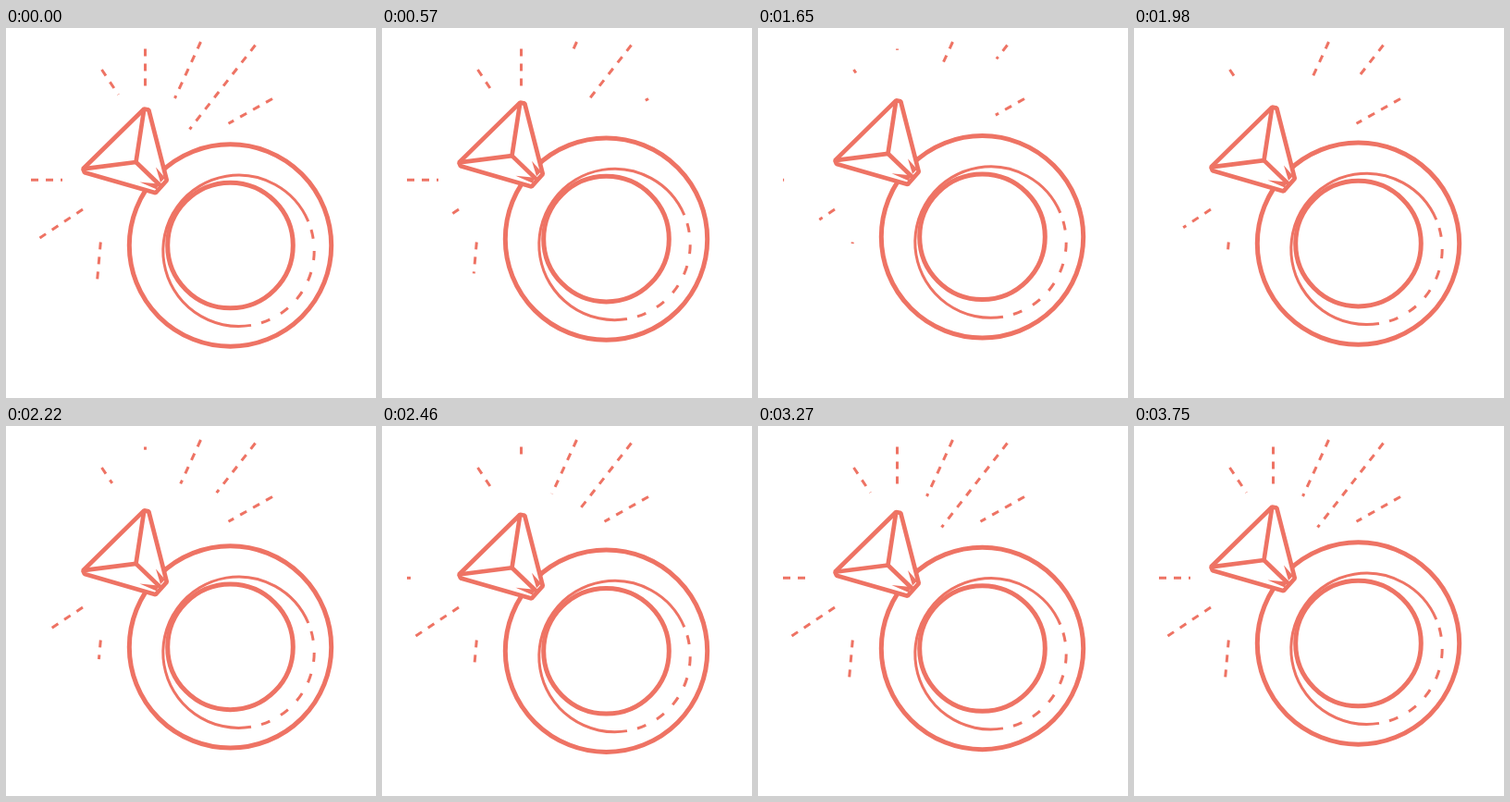
Write an HTML page with a canvas that moves like this. It is 400x400 px and loops after 4.05 s.

```html
<!DOCTYPE html>
<html lang="en">
<head>
<meta charset="utf-8">
<title>Diamond ring</title>
<style>
  html, body { margin: 0; width: 100%; height: 100%; overflow: hidden; background: #fff; }
  canvas { display: block; width: 400px; height: 400px; }
</style>
</head>
<body>
<canvas id="stage"></canvas>
<script>
const LOOP = 4050, LAST = 3750, STEP = 30;
const CORAL = '#ee7364';
const canvas = document.getElementById('stage');
const ctx = canvas.getContext('2d');
const scale = window.devicePixelRatio || 1;
canvas.width = canvas.height = 400 * scale;

// Vertical path of the ring: [time, y, speed]
const bob = [[0, 235, -0.0125], [1370, 223.2, 0], [2650, 244.5, 0], [LAST, 235, -0.0107]];

// Each ray: fixed end, free end, [shrink start, end], [grow start, end]
const rays = [
  { from: [103.5, 45], to: [121.5, 72], shrink: [430, 1030], grow: [1500, 2650] },
  { from: [150.5, 22.5], to: [150.5, 62.5], shrink: [1070, 1670], grow: [2130, 3240] },
  { from: [210.5, 15], to: [182.5, 76], shrink: [70, 670], grow: [1170, 2520] },
  { from: [269.5, 18.5], to: [198.5, 109.5], shrink: [370, 970], grow: [1430, 2770] },
  { from: [288, 76.5], to: [240.5, 103.3], shrink: [10, 610], grow: [1060, 1960] },
  { from: [27, 164.3], to: [61, 164.3], shrink: [1070, 1670], grow: [2300, 3650] },
  { from: [83, 196], to: [36.5, 227], shrink: [60, 660], grow: [1230, 2400] },
  { from: [102.3, 231.5], to: [98.7, 271.5], shrink: [480, 1057], grow: [1600, 2800] }
];

const clamp = v => Math.min(1, Math.max(0, v));
const progress = (t, [start, end]) => clamp((t - start) / (end - start));
const radians = deg => deg * Math.PI / 180;

function ringY(t) {
  const i = Math.max(1, bob.findIndex(key => t <= key[0]));
  const [t0, y0, v0] = bob[i - 1], [t1, y1, v1] = bob[i];
  const span = t1 - t0, u = (t - t0) / span, w = 1 - u;
  return y0 * w * w * (1 + 2 * u) + y1 * u * u * (3 - 2 * u)
    + span * (v0 * u * w * w - v1 * u * u * w);
}

function arc(x, y, r, start, end, width) {
  ctx.lineWidth = width;
  ctx.beginPath();
  ctx.arc(x, y, r, radians(start), radians(end));
  ctx.stroke();
}

function trace(points, closed) {
  ctx.beginPath();
  points.forEach(p => ctx.lineTo(...p));
  if (closed) ctx.closePath();
}

function drawRay({ from, to, shrink, grow }, t) {
  const part = t < grow[0] ? 1 - progress(t, shrink) : progress(t, grow);
  if (part <= 0) return;
  const tip = from.map((v, i) => v + (to[i] - v) * part);
  ctx.lineWidth = 3;
  ctx.setLineDash([8, 8]);
  trace([from, tip]);
  ctx.stroke();
  ctx.setLineDash([]);
}

function drawRing() {
  arc(242.5, 235, 109.2, 0, 360, 5);
  arc(242.5, 235, 67.8, 0, 360, 5);
  arc(251.5, 240.8, 81.7, 80.5, 337.2, 3);
  for (let i = 0; i < 6; i++) {
    const start = -16.2 + i * 16.35;
    arc(251.5, 240.8, 81.7, start, start + 7, 3);
  }
}

function drawDiamond() {
  const apex = [149.3, 87.5], left = [83.3, 152.3], hub = [140.5, 145];
  ctx.lineWidth = 4.7;
  ctx.lineJoin = 'bevel';
  trace([apex, left, [85, 156.2], [161.7, 178.3], [173.8, 164.7], [154.3, 88.5]], true);
  ctx.fillStyle = '#fff';
  ctx.fill();
  ctx.stroke();
  trace([left, hub, apex]);
  ctx.stroke();
  trace([hub, [167, 170.5]]);
  ctx.stroke();
  ctx.fillStyle = CORAL;
  trace([[144.5, 166.5], [165, 168.5], [163, 174.5]], true);
  ctx.fill();
  trace([[162, 150.5], [167, 167], [172, 162]], true);
  ctx.fill();
}

function draw(t) {
  ctx.setTransform(scale, 0, 0, scale, 0, 0);
  ctx.fillStyle = '#fff';
  ctx.fillRect(0, 0, 400, 400);
  ctx.strokeStyle = CORAL;
  rays.forEach(ray => drawRay(ray, t));
  ctx.translate(0, ringY(t) - 235);
  drawRing();
  drawDiamond();
}

const began = performance.now();
function tick() {
  const time = (performance.now() - began) % LOOP;
  draw(Math.min(LAST, Math.floor(time / STEP) * STEP));
  requestAnimationFrame(tick);
}
tick();
</script>
</body>
</html>
```
